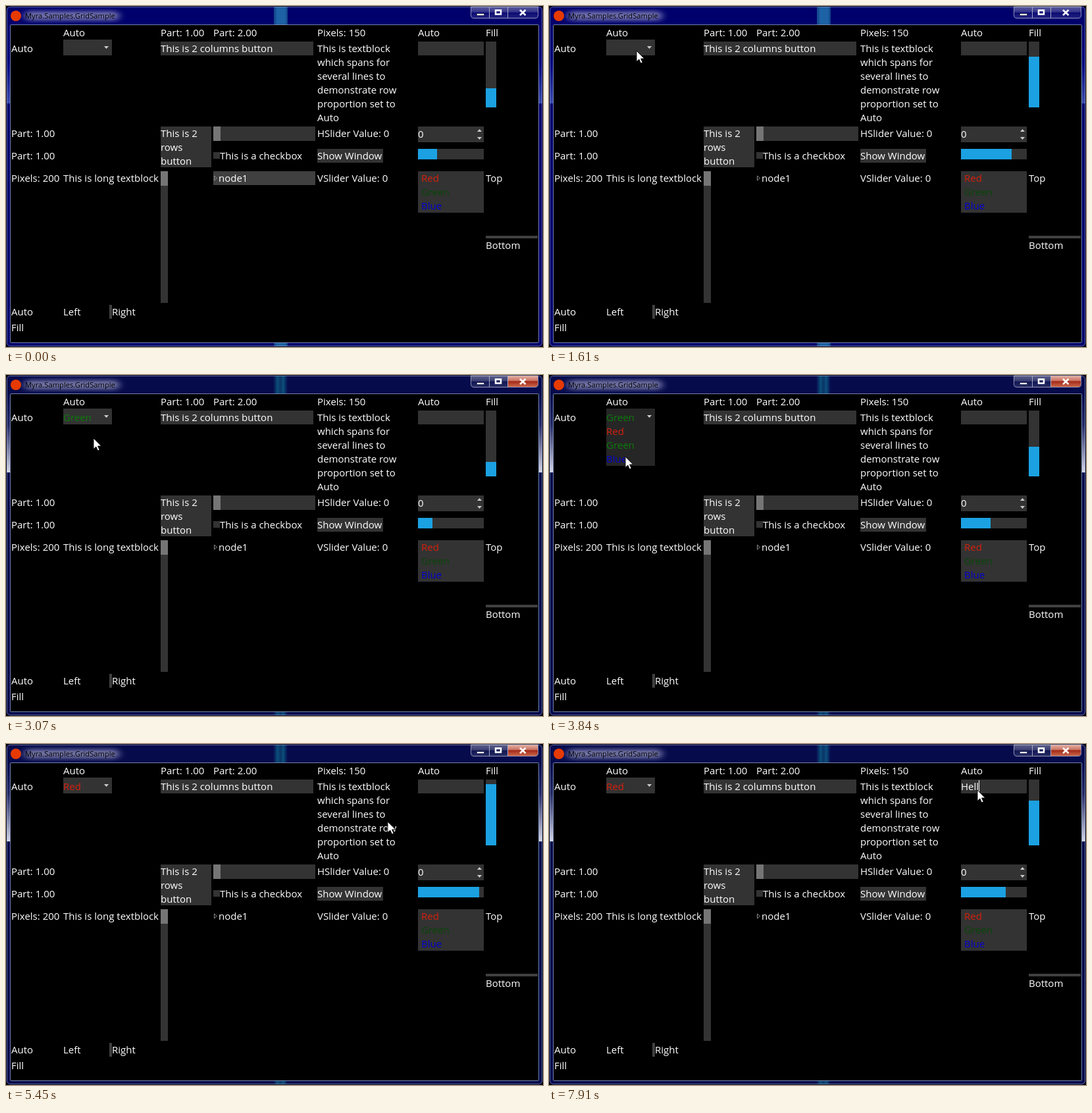
Animation of 816x518 px, one loop 7990 ms. Source, as an HTML page:

```html
<!DOCTYPE html>
<html lang="en">
<head>
<meta charset="utf-8">
<title>Grid sample</title>
<style>
  html, body { margin: 0; width: 100%; height: 100%; overflow: hidden; background: #000; }
  svg { display: block; width: 816px; height: 518px; }
  text { font: 15px "Open Sans", "Noto Sans", sans-serif; fill: #fff; white-space: pre; }
  .title { font-size: 11.2px; fill: #000; }
  .box { fill: #333; }
  .knob { fill: #757575; }
  .split { fill: #404040; }
  .bar { fill: #1ba1e2; }
  .arrow { fill: #ccc; }
  .red { fill: #d8200c; }
  .green { fill: #0a7d0a; }
  .dim { fill: #064806; }
  .blue { fill: #0000cf; }
</style>
</head>
<body>
<svg viewBox="0 0 816 518">
  <defs>
    <linearGradient id="sideIdle" x2="0" y2="1">
      <stop stop-color="#00006c"/><stop offset=".45" stop-color="#00007c"/><stop offset="1" stop-color="#3b4cae"/>
    </linearGradient>
    <linearGradient id="sideActive" x2="0" y2="1">
      <stop stop-color="#060b4c"/><stop offset=".4" stop-color="#252c68"/><stop offset="1" stop-color="#d4d7e6"/>
    </linearGradient>
    <linearGradient id="stripeIdle">
      <stop stop-color="#123f88"/><stop offset=".25" stop-color="#1d62a4"/>
      <stop offset=".8" stop-color="#1d62a4"/><stop offset="1" stop-color="#123f88"/>
    </linearGradient>
    <linearGradient id="stripeActive">
      <stop stop-color="#060b4c"/><stop offset=".3" stop-color="#0b4f7c"/><stop offset=".5" stop-color="#0a3566"/>
      <stop offset=".7" stop-color="#0b4f7c"/><stop offset="1" stop-color="#060b4c"/>
    </linearGradient>
    <linearGradient id="closeRed" x2="0" y2="1">
      <stop stop-color="#d58a78"/><stop offset=".45" stop-color="#bd4a35"/>
      <stop offset=".5" stop-color="#9c1c0c"/><stop offset="1" stop-color="#c4512f"/>
    </linearGradient>
    <linearGradient id="glass" x2="0" y2="1">
      <stop stop-color="#fff" stop-opacity=".36"/><stop offset=".48" stop-color="#fff" stop-opacity=".2"/>
      <stop offset=".5" stop-color="#fff" stop-opacity=".04"/><stop offset="1" stop-color="#fff" stop-opacity=".14"/>
    </linearGradient>
    <filter id="blur" x="-20%" y="-100%" width="140%" height="300%"><feGaussianBlur stdDeviation="6 3"/></filter>
  </defs>

  <g id="idle">
    <rect width="816" height="518" rx="6" fill="#00006c"/>
    <rect y="28" width="816" height="120" fill="url(#sideIdle)"/>
    <rect x="407" width="21" height="518" fill="url(#stripeIdle)"/>
  </g>
  <g id="active">
    <rect width="816" height="518" rx="6" fill="#060b4c"/>
    <rect y="28" width="816" height="120" fill="url(#sideActive)"/>
    <rect x="406" width="22" height="518" fill="url(#stripeActive)"/>
  </g>
  <rect x=".5" y=".5" width="815" height="517" rx="6" fill="none" stroke="#05051c"/>
  <rect x="1.5" y="1.5" width="813" height="515" rx="5" fill="none" stroke="#a8b4dc" stroke-opacity=".55"/>
  <rect x="6.5" y="28.5" width="803" height="483" rx="1" stroke="#8fa0cf" stroke-opacity=".8"/>

  <rect x="28" y="8" width="144" height="14" rx="7" fill="#a4a4cc" opacity=".68" filter="url(#blur)"/>
  <circle cx="15" cy="15" r="8" fill="#e63a00"/>
  <text class="title" x="29" y="19">Myra.Samples.GridSample</text>

  <path id="close" d="M762 1H808V14Q808 18 804 18H762Z" fill="url(#closeRed)"/>
  <g fill="url(#glass)" stroke="#a9aecb" stroke-opacity=".8">
    <path d="M706.5 1V14Q706.5 18.5 711 18.5H734.5V1Z"/>
    <path d="M734.5 1V18.5H762.5V1Z"/>
    <path id="closeEdge" d="M762.5 1V18.5H804Q808.5 18.5 808.5 14V1Z"/>
  </g>
  <g fill="none" stroke="#fff">
    <rect x="715.5" y="11.5" width="11" height="3" fill="#fff" stroke="#333a58"/>
    <rect x="744" y="6.500" width="8" height="6" stroke-width="2.500"/>
    <path d="M781 6L789.500 14M789.500 6L781 14" stroke-width="2.600"/>
  </g>

  <g id="widgets"></g>
  <path class="arrow" d="M149 61H156L152.500 65ZM716 191H723L719.500 187ZM716 199H723L719.500 203Z"/>
  <path d="M316.500 258V265L320.500 261.500Z" fill="none" stroke="#8c8c8c"/>
  <g id="labels"></g>

  <text id="choice" x="87" y="70"></text>
  <text id="typed" x="626" y="70"></text>
  <rect id="caret" y="55" width="1" height="18" fill="#fff"/>
  <g id="menu">
    <rect x="87" y="75" width="74" height="63" fill="#262626"/>
    <text class="red" x="87" y="91">Red</text>
    <text class="green" x="87" y="112">Green</text>
    <text class="blue" x="87" y="133">Blue</text>
  </g>
  <path id="cursor" d="M0 0V16.500L3.800 13L6.500 19L9.200 17.800L6.600 12H11.800Z" fill="#fff" stroke="#000" stroke-width=".9"/>
</svg>

<script>
const LOOP = 7990, STEP = 76.9;
const byId = id => document.getElementById(id);

function add(parent, tag, attrs, content = "") {
  const node = document.createElementNS("http://www.w3.org/2000/svg", tag);
  for (const key in attrs) node.setAttribute(key, attrs[key]);
  node.textContent = content;
  byId(parent).append(node);
  return node;
}
const box = (x, y, width, height, cls = "box") =>
  add("widgets", "rect", { x, y, width, height, class: cls });
const label = (x, y, content, cls = "") =>
  content.split("\n").forEach((line, i) => add("labels", "text", { x, y: y + 21 * i, class: cls }, line));

const combo = box(87, 51, 74, 24);
box(235, 54, 232, 21);
box(626, 54, 100, 21);
box(729, 54, 16, 100);
box(235, 183, 77, 62);
box(315, 183, 155, 22);
box(315, 183, 11, 22, "knob");
box(626, 183, 100, 24);
box(315, 222, 10, 10);
box(473, 217, 100, 21);
box(626, 217, 100, 16);
box(626, 251, 100, 63);
box(235, 251, 11, 200);
box(235, 251, 11, 22, "knob");
box(729, 349, 79, 4, "split");
box(157, 454, 4, 21, "split");
const nodeRow = box(315, 251, 155, 21, "split");
const barV = box(729, 54, 16, 0, "bar");
const barH = box(626, 217, 0, 16, "bar");

label(87, 46, "Auto");
label(235, 46, "Part: 1.00");
label(315, 46, "Part: 2.00");
label(473, 46, "Pixels: 150");
label(626, 46, "Auto");
label(729, 46, "Fill");
label(8, 70, "Auto");
label(235, 70, "This is 2 columns button");
label(473, 70, "This is textblock\nwhich spans for\nseveral lines to\ndemonstrate row\nproportion set to\nAuto");
label(8, 199, "Part: 1.00");
label(235, 199, "This is 2\nrows\nbutton");
label(473, 199, "HSlider Value: 0");
label(626, 200, "0");
label(8, 233, "Part: 1.00");
label(325, 233, "This is a checkbox");
label(473, 233, "Show Window");
label(8, 267, "Pixels: 200");
label(87, 267, "This is long textblock");
label(323, 267, "node1");
label(473, 267, "VSlider Value: 0");
label(631, 267, "Red", "red");
label(631, 288, "Green", "dim");
label(631, 309, "Blue", "blue");
label(729, 267, "Top");
label(729, 369, "Bottom");
label(8, 470, "Auto");
label(87, 470, "Left");
label(161, 470, "Right");
label(8, 494, "Fill");

// Pointer path: time, x, y
const path = [
  [70, 300, 456], [430, 88, 125], [680, 96, 99], [910, 105, 104], [1230, 96, 100],
  [1690, 136, 66], [1840, 142, 61], [2000, 142, 61], [2480, 118, 104], [2700, 118, 104],
  [3070, 133, 96], [3330, 143, 63], [3520, 143, 63], [3820, 116, 124], [3960, 116, 124],
  [4190, 142, 64], [4270, 142, 64], [4400, 120, 88], [4530, 125, 101], [4690, 128, 102],
  [5070, 539, 124], [5450, 580, 118], [5850, 651, 70], [LOOP, 651, 70]
];
const picks = [[0, ""], [2630, "Green"], [3980, "Blue"], [4450, "Red"]];
const typing = [[0, ""], [6900, "H"], [7180, "He"], [7460, "Hel"], [7760, "Hell"]];
const openSpans = [[1840, 2630], [3480, 3980], [4240, 4450]];

const latest = (events, t) => events.filter(e => e[0] <= t).pop()[1];
const show = (node, visible) => node.setAttribute("visibility", visible ? "visible" : "hidden");

function pointerAt(t) {
  const i = Math.max(1, path.findIndex(p => p[0] >= t));
  const [t0, x0, y0] = path[i - 1], [t1, x1, y1] = path[i];
  const u = Math.max(0, (t - t0) / (t1 - t0)), k = u * u * (3 - 2 * u);
  return [Math.round(x0 + (x1 - x0) * k), Math.round(y0 + (y1 - y0) * k)];
}

function draw(now) {
  const real = now % LOOP;
  const step = Math.min(103, Math.floor((real + 16) / STEP));
  const t = step * STEP;

  const progress = Math.floor(29.2 + step * 2.32) % 100;
  barV.setAttribute("y", 154 - progress);
  barV.setAttribute("height", progress);
  barH.setAttribute("width", progress);

  const active = t >= 1800;
  show(byId("idle"), !active);
  for (const id of ["active", "close"]) show(byId(id), active);
  show(nodeRow, t < 150);

  const open = openSpans.some(([a, b]) => t >= a && t < b);
  show(byId("menu"), open);
  combo.style.fill = open ? "#262626" : "";
  const choice = latest(picks, t);
  byId("choice").textContent = choice;
  byId("choice").setAttribute("class", choice.toLowerCase());

  const typed = byId("typed");
  typed.textContent = latest(typing, t);
  byId("caret").setAttribute("x", 626 + Math.round(typed.getComputedTextLength()));
  show(byId("caret"), t >= 6080 && Math.floor((t - 6080) / 450) % 2 === 0);

  show(byId("cursor"), t >= 70);
  byId("cursor").setAttribute("transform", `translate(${pointerAt(t)})`);
}

const start = performance.now();
function tick() {
  draw(performance.now() - start);
  requestAnimationFrame(tick);
}
tick();
</script>
</body>
</html>
```
